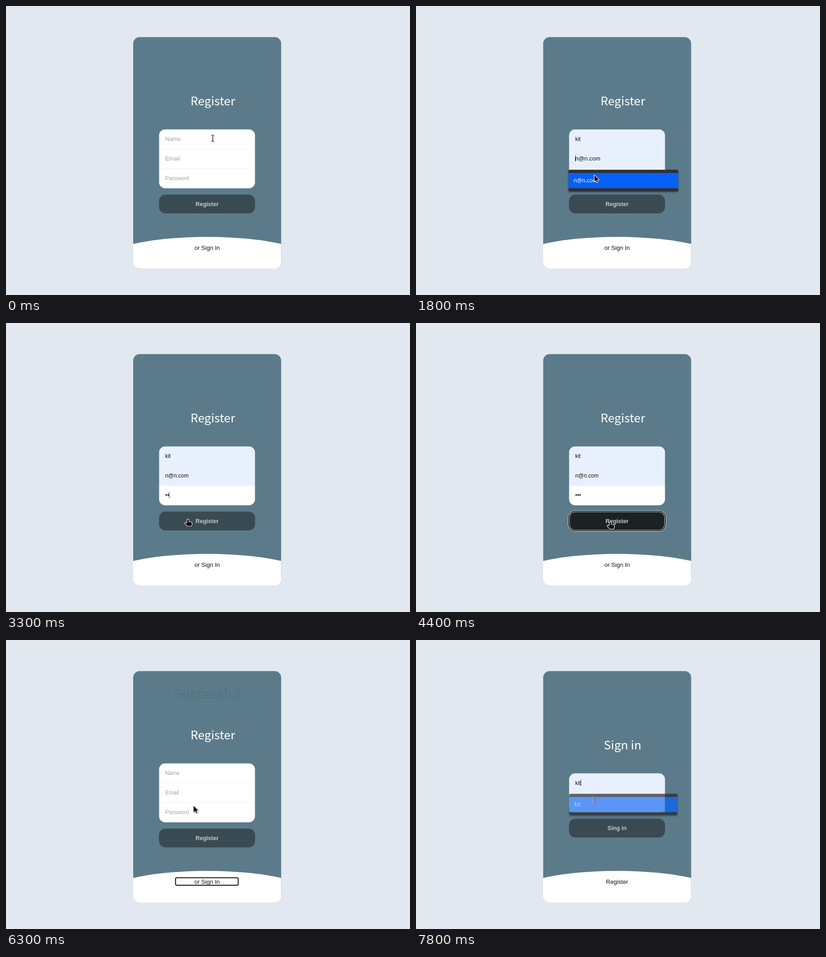
These frames come from a looping animation (883 by 634 pixels, 8000 ms). An HTML page with a canvas:

```html
<!DOCTYPE html>
<html lang="en">
<head>
<meta charset="utf-8">
<title>Register form</title>
<style>
html, body { margin: 0; width: 100%; height: 100%; overflow: hidden; background: #e1e8ef; }
canvas { display: block; width: 883px; height: 634px; }
</style>
</head>
<body>
<canvas id="stage"></canvas>
<script>
const LOOP = 8000;
const USER = 'kit', MAIL = 'n@n.com';
const SANS = '"Liberation Sans", Arial, sans-serif';
const TITLE = '"Noto Sans CJK JP", "Noto Sans CJK SC", "Noto Sans", sans-serif';
const MENU = '"Noto Sans", "Open Sans", sans-serif';
const CARD = '#5c7b8a', FILLED = '#e8f0fe', HINT = '#a3a3a3';
const LEFT = 334.4, WIDTH = 210, MID = 439.5, TEXT_X = 348;

const canvas = document.getElementById('stage');
const ctx = canvas.getContext('2d');
const ratio = window.devicePixelRatio || 1;
canvas.width = 883 * ratio;
canvas.height = 634 * ratio;

// time, x, y, pointer kind
const POINTER = [
  [0, 451, 290, 'beam'], [500, 449, 292, 'beam'], [600, 434, 307, 'arrow'],
  [800, 405, 332, 'arrow'], [1000, 405, 332, 'beam'], [1100, 403, 333, 'beam'],
  [1300, 391, 338, 'beam'], [1500, 389, 362, 'arrow'], [1700, 389, 369, 'arrow'],
  [2000, 389, 373, 'beam'], [2300, 390, 380, 'beam'], [2800, 391, 390, 'beam'],
  [2900, 393, 416, 'hand'], [3000, 396, 456, 'arrow'], [3100, 397, 445, 'hand'],
  [3300, 397, 430, 'hand'], [3400, 397, 430, 'hand'], [3800, 424, 436, 'hand'],
  [4700, 424, 438, 'hand'], [4900, 424, 464, 'arrow'], [5100, 423, 480, 'arrow'],
  [5200, 423, 480, 'arrow'], [5400, 427, 524, 'hand'], [5600, 429, 535, 'hand'],
  [5800, 429, 535, 'hand'], [6000, 419, 420, 'hand'], [6200, 419, 420, 'hand'],
  [6300, 409, 363, 'arrow'], [6600, 409, 363, 'arrow'], [6900, 387, 316, 'beam'],
  [7100, 387, 318, 'beam'], [7200, 387, 338, 'arrow'], [7400, 388, 352, 'arrow'],
  [7800, 388, 352, 'beam']
];

const clamp = v => Math.max(0, Math.min(1, v));
const between = (t, a, b) => t >= a && t < b;
const lerp = (a, b, k) => a + (b - a) * k;

function box(x, y, w, h, r, fill) {
  ctx.beginPath();
  ctx.roundRect(x, y, w, h, r);
  ctx.fillStyle = fill;
  ctx.fill();
}

function text(str, x, y, font, color, align = 'left') {
  ctx.font = font;
  ctx.fillStyle = color;
  ctx.textAlign = align;
  ctx.fillText(str, x, y);
}

function ring(x, y, w, h, r) {
  ctx.beginPath();
  ctx.roundRect(x, y, w, h, r);
  ctx.strokeStyle = '#fff';
  ctx.lineWidth = 3.6;
  ctx.stroke();
  ctx.strokeStyle = '#101010';
  ctx.lineWidth = 2;
  ctx.stroke();
}

function drawCard(withWave) {
  ctx.save();
  ctx.beginPath();
  ctx.roundRect(278, 68.3, 323.4, 507.5, 14);
  ctx.clip();
  ctx.fillStyle = CARD;
  ctx.fillRect(270, 60, 340, 520);
  if (withWave) {
    ctx.fillStyle = '#fff';
    ctx.beginPath();
    ctx.ellipse(439.7, 567, 242.5, 60.5, 0, 0, Math.PI * 2);
    ctx.fill();
    ctx.fillRect(278, 560, 324, 20);
  }
  ctx.restore();
}

// field: { hint, value, filled, preview, caret }
function drawFields(top, fields) {
  const step = 43.2, height = fields.length * step;
  ctx.save();
  ctx.beginPath();
  ctx.roundRect(LEFT, top, WIDTH, height, 14);
  ctx.clip();
  fields.forEach((f, i) => {
    const y = top + i * step, base = Math.round(top + 25.4 + i * step);
    ctx.fillStyle = f.filled ? FILLED : '#fff';
    ctx.fillRect(LEFT, y, WIDTH, step + 0.5);
    if (i < fields.length - 1 && !f.filled) {
      ctx.fillStyle = '#eee';
      ctx.fillRect(LEFT, Math.floor(y + step - 0.6), WIDTH, 1);
    }
    const font = (f.preview ? 12.8 : 11.9) + 'px ' + SANS;
    text(f.value || f.hint, TEXT_X, base, font, f.value ? '#111' : HINT);
    if (f.caret) {
      const x = TEXT_X + (f.preview || !f.value ? 0 : ctx.measureText(f.value).width);
      ctx.fillStyle = '#111';
      ctx.fillRect(Math.round(x), base - 11, 1, 13);
    }
  });
  ctx.restore();
}

function drawButton(label, y, dark, focused) {
  const shade = [57, 27].map((a, i) => a);
  const mix = (a, b) => Math.round(lerp(a, b, dark));
  box(LEFT, y, WIDTH, 41.3, 14, `rgb(${mix(shade[0], shade[1])},${mix(74, 34)},${mix(82, 36)})`);
  if (focused) ring(LEFT - 0.5, y - 0.5, WIDTH + 1, 42.3, 14);
  text(label, MID, y + 25, 'bold 12.6px ' + SANS, '#c3c8ca', 'center');
}

function drawMenu(y, label, hover, alpha) {
  const inset = alpha < 1 ? 1.6 : 0;
  ctx.save();
  ctx.globalAlpha = alpha;
  ctx.shadowColor = 'rgba(0,0,0,.4)';
  ctx.shadowBlur = 4;
  ctx.shadowOffsetY = 1.5;
  box(333.2 + inset, y, 239.8 - inset * 2, 47.6, 3, '#303134');
  ctx.shadowColor = 'transparent';
  if (hover) {
    // punch the row so the fading blue is not darkened by the frame
    ctx.fillStyle = '#0561f5';
    ctx.globalAlpha = 1;
    if (alpha < 1) {
      ctx.fillStyle = alpha > 0.7 ? '#468af6' : '#5b96f7';
      ctx.fillRect(333.2 + inset, y + 7, 209.6, 33.4);
      ctx.fillStyle = '#1c68da';
      ctx.fillRect(544.4, y + 7, 27, 33.4);
    } else {
      ctx.fillRect(333.2, y + 7, 239.8, 33.4);
    }
  }
  ctx.globalAlpha = alpha;
  text(label, 344.6 + inset, y + 27.7, '12px ' + MENU, '#fff');
  ctx.restore();
}

function outline(points, x, y) {
  ctx.beginPath();
  points.forEach(([px, py]) => ctx.lineTo(x + px, y + py));
  ctx.closePath();
}

function drawPointer(kind, x, y) {
  ctx.save();
  ctx.lineJoin = 'round';
  ctx.shadowColor = 'rgba(0,0,0,.35)';
  ctx.shadowBlur = 2;
  ctx.shadowOffsetX = ctx.shadowOffsetY = 1;
  ctx.strokeStyle = '#fff';
  ctx.fillStyle = '#111';
  if (kind === 'beam') {
    ctx.beginPath();
    for (const s of [-1, 1]) {
      ctx.moveTo(x - 2.5, y + s * 6.5);
      ctx.lineTo(x + 3.5, y + s * 6.5);
    }
    ctx.moveTo(x + 0.5, y - 6.5);
    ctx.lineTo(x + 0.5, y + 6.5);
    ctx.lineWidth = 3;
    ctx.stroke();
    ctx.shadowColor = 'transparent';
    ctx.strokeStyle = '#111';
    ctx.lineWidth = 1.2;
    ctx.stroke();
  } else {
    outline(kind === 'arrow'
      ? [[1, 1], [1, 15], [4.3, 12], [6.8, 17], [9, 16], [6.7, 11.2], [11.2, 11]]
      : [[-1, 1], [1, 0.6], [2.3, 2], [2.3, 6], [8, 7], [9.5, 8.5], [9, 13],
         [7.5, 15.5], [0, 15.5], [-6, 9.5], [-5, 7.8], [-1.4, 9.5]], x, y);
    ctx.lineWidth = 2.2;
    ctx.stroke();
    ctx.shadowColor = 'transparent';
    ctx.fill();
  }
  ctx.restore();
}

function pointerAt(t) {
  let i = POINTER.length - 1;
  while (POINTER[i][0] > t) i--;
  const [a, x, y, kind] = POINTER[i];
  const next = POINTER[i + 1];
  // rests until just before the first move, the long waits and the last switch
  if (!next || (next[0] - a > 400 && kind === next[3]) || next[0] - a === 900) return [kind, x, y];
  const k = (t - a) / (next[0] - a);
  return [kind, lerp(x, next[1], k), lerp(y, next[2], k)];
}

function drawRegister(t) {
  const sent = t >= 4700;
  const nameOn = !sent && t >= 700, mailOn = !sent && t >= 1600;
  const dots = sent || t < 2800 ? 0 : t < 2900 ? 1 : t < 3500 ? 2 : 3;
  if (sent) text('Successful', MID, 129, '500 30px ' + TITLE, '#527380', 'center');
  text('Register', 452, 218, '500 26px ' + TITLE, '#fff', 'center');
  drawFields(270.5, [
    { hint: 'Name', value: nameOn ? USER : '', filled: nameOn,
      preview: t < 1000, caret: between(t, 500, 1300) },
    { hint: 'Email', value: mailOn ? MAIL : '', filled: mailOn,
      preview: t < 2000, caret: between(t, 1300, 2300) },
    { hint: 'Password', value: '•'.repeat(dots), caret: between(t, 2300, 4200) }
  ]);
  const dark = clamp((t - 3400) / 400) * (1 - clamp((t - 5200) / 400));
  drawButton('Register', 413.8, dark, between(t, 4200, 4700));
  if (t >= 5800) ring(370.5, 521.5, 137, 16.5, 3);
  text('or Sign In', MID, 535, '13px ' + SANS, '#111', 'center');

  if (between(t, 500, 1100)) drawMenu(315.8, USER, t >= 700, t < 1000 ? 1 : 0.74);
  if (between(t, 1400, 2100)) drawMenu(359.2, MAIL, t >= 1600, t < 2000 ? 1 : 0.74);
}

function drawSignIn(t) {
  const on = t >= 7400;
  text('Sign in', 451.5, 240, '500 26px ' + TITLE, '#fff', 'center');
  drawFields(292.3, [
    { hint: 'Name', value: on ? USER : '', filled: on, preview: t < 7800, caret: t >= 7000 },
    { hint: 'Password' }
  ]);
  drawButton('Sing in', 392, 0, false);
  text('Register', MID, 535, '13px ' + SANS, '#111', 'center');
  if (t >= 7100) drawMenu(337.2, USER, on, t < 7800 ? 1 : 0.67);
}

function draw(t) {
  ctx.setTransform(ratio, 0, 0, ratio, 0, 0);
  ctx.fillStyle = '#e1e8ef';
  ctx.fillRect(0, 0, 883, 634);
  const blank = between(t, 6500, 6600);
  drawCard(!blank);
  if (t < 6500) drawRegister(t);
  else if (!blank) drawSignIn(t);
  drawPointer(...pointerAt(t));
}

const start = performance.now();
function tick() {
  const t = (performance.now() - start) % LOOP;
  draw(Math.floor(t / 100) * 100);
  requestAnimationFrame(tick);
}
tick();
</script>
</body>
</html>
```
